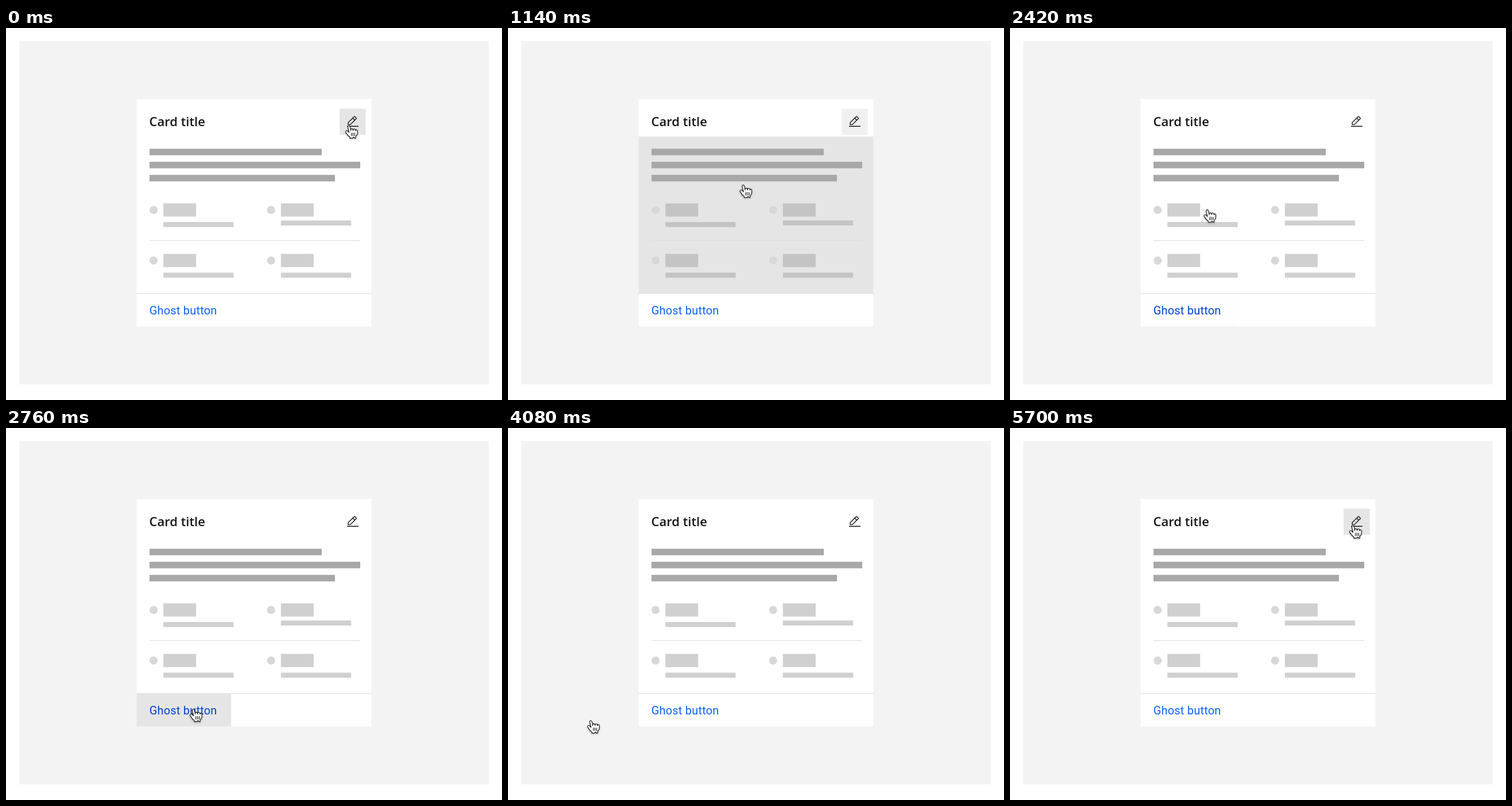
An HTML page that plays this animation: 864x648 px, repeating every 7.1 s.

```html
<!DOCTYPE html>
<html lang="en">
<head>
<meta charset="utf-8">
<title>Card actions</title>
<style>
  html, body { margin: 0; width: 100%; height: 100%; overflow: hidden; background: #fff; }
  svg { display: block; }
  .title { font: 600 22px "Open Sans", "Noto Sans", sans-serif; fill: #161616; }
  .link { font: 400 20px Roboto, "Noto Sans", sans-serif; letter-spacing: .2px; fill: #0f62fe; }
  .bar { fill: #a8a8a8; }
  .box { fill: #d0d0d0; }
  .dot { fill: #d8d8d8; }
  .rule { fill: #e0e0e0; }
  .shade { fill: none; }
  .picked .shade { fill: #e5e5e5; }
  .picked .box { fill: #c4c4c4; }
  #hand { filter: drop-shadow(0 1.4px 1.2px rgba(0, 0, 0, .32)); }
</style>
</head>
<body>
<svg width="864" height="648" viewBox="0 0 864 648">
  <rect x="22.7" y="22.9" width="818.6" height="597.7" fill="#f3f3f3"/>
  <rect x="227.4" y="123.8" width="409.2" height="396" fill="#fff"/>
  <text class="title" x="249.5" y="170.5">Card title</text>
  <rect id="edit" x="581.2" y="140.7" width="45.5" height="45.3"/>
  <path transform="translate(592.6 152) scale(.711)" fill="#161616" fill-rule="evenodd"
    d="M2 26H30V28H2zM25.4 9c.8-.8.8-2 0-2.8l-3.6-3.6c-.8-.8-2-.8-2.8 0L4 17.6V24h6.4zM20.4 4L24 7.6l-3 3L17.4 7zM6 22v-3.6l10-10 3.6 3.6-10 10z"/>
  <g id="content">
    <rect class="rule" x="227.4" y="461.8" width="409.2" height="1.4"/>
    <rect class="shade" x="227.4" y="189" width="409.2" height="274"/>
    <rect class="bar" x="250" y="210.3" width="300" height="11.4"/>
    <rect class="bar" x="250" y="233" width="367" height="11.4"/>
    <rect class="bar" x="250" y="255.8" width="323" height="11.4"/>
    <rect class="rule" x="250" y="369.5" width="367" height="1.4"/>
  </g>
  <rect id="hover" x="227.4" y="463" width="164.8" height="56.8" fill="#e5e5e5"/>
  <text class="link" id="link" x="249.7" y="499">Ghost button</text>
  <g id="hand" stroke="#000" stroke-width=".75" stroke-linecap="round" stroke-linejoin="round">
    <path fill="#fff" d="M11.3 20.4c-.3-.4-.6-1.1-1.2-2c-.3-.5-1.2-1.5-1.5-1.9c-.2-.4-.2-.6-.1-1c.1-.6.7-1.1 1.4-1.1c.5 0 1 .4 1.4.7c.2.2.5.6.7.8c.2.2.2.3.4.5c.2.3.3.5.2.1c-.1-.5-.2-1.3-.4-2.1c-.1-.6-.2-.7-.3-1.1c-.1-.5-.2-.8-.3-1.3c-.1-.3-.2-1.1-.3-1.5c-.1-.5-.1-1.4.3-1.8c.3-.3.9-.4 1.3-.2c.5.3.8 1 .9 1.3c.2.5.4 1.2.5 2c.2 1 .5 2.5.5 2.8c0-.4-.1-1.1 0-1.5c.1-.3.3-.7.7-.8c.3-.1.6-.1.9-.1c.3.1.6.3.8.5c.4.6.4 1.9.4 1.8c.1-.4.1-1.2.3-1.6c.1-.2.5-.4.7-.5c.3-.1.7-.1 1 0c.2 0 .6.3.7.5c.2.3.3 1.3.4 1.7c0 .1.1-.4.3-.7c.4-.6 1.8-.8 1.9.6v2.3c0 .4-.1 1.3-.2 1.7c-.1.3-.4 1-.7 1.4c0 0-1.1 1.2-1.2 1.8c-.1.6-.1.6-.1 1c0 .4.1.9.1.9s-.8.1-1.2 0c-.4-.1-.9-.8-1-1.1c-.2-.3-.5-.3-.7 0c-.2.4-.7 1.1-1.1 1.1c-.7.1-2.1 0-3.1 0c0 0 .2-1-.2-1.4c-.3-.3-.8-.8-1.1-1.1z"/>
    <path fill="none" d="M19.6 20.7V17.3M17.6 20.7L17.5 17.3M15.6 17.3V20.7"/>
  </g>
</svg>
<script>
const LOOP = 7100, STEP = 20, STEPS = 18;
const $ = id => document.getElementById(id);

function add(tag, cls, attrs) {
  const el = document.createElementNS("http://www.w3.org/2000/svg", tag);
  el.setAttribute("class", cls);
  for (const k in attrs) el.setAttribute(k, attrs[k]);
  $("content").append(el);
}

// Four placeholder items: x, y, y of the caption bar
for (const [x, y, cap] of [[250, 317, 338], [454.7, 317, 335.3], [250, 405, 426.2], [454.7, 405, 426.2]]) {
  add("circle", "dot", { cx: x + 7.1, cy: y, r: 7.1 });
  add("rect", "box", { x: x + 24.2, y: y - 11.5, width: 57, height: 23 });
  add("rect", "box", { x: x + 24.2, y: cap, width: 122.3, height: 8.7 });
}

// Pose after each move: start time, hand position, opacity of edit and hover backgrounds
const poses = [
  { at: -Infinity, x: 579.6, y: 158.3, edit: 1, hover: 0 },
  { at: 1000, x: 326.6, y: 297.8, edit: 0, hover: 0, picked: true },
  { at: 2420, x: 308.6, y: 477.8, edit: 0, hover: 1 },
  { at: 3740, x: 126.6, y: 497.8, edit: 0, hover: 0 },
  { at: 5360, x: 579.6, y: 158.3, edit: 1, hover: 0 }
];

// cubic-bezier(.25, .1, .25, 1)
function ease(x) {
  let lo = 0, hi = 1;
  for (let i = 0; i < 30; i++) {
    const m = (lo + hi) / 2;
    if (.75 * m * (1 - m) + m ** 3 < x) lo = m; else hi = m;
  }
  return .3 * lo * (1 - lo) ** 2 + 3 * lo * lo * (1 - lo) + lo ** 3;
}

function draw() {
  const t = performance.now() % LOOP;
  const n = poses.findLastIndex(p => t >= p.at);
  const to = poses[n], from = poses[Math.max(n - 1, 0)];
  const k = ease(Math.min(1, (Math.floor((t - to.at) / STEP) + 1) / STEPS));
  const mix = key => from[key] + (to[key] - from[key]) * k;

  $("hand").setAttribute("transform", `translate(${mix("x")} ${mix("y")}) scale(1.422)`);
  $("content").classList.toggle("picked", !!to.picked);
  $("edit").style.fill = to.picked ? "#c6c6c6" : "#e5e5e5";
  $("edit").style.opacity = mix("edit");
  $("hover").style.opacity = mix("hover");
  $("link").style.fill = to.hover ? "#0043ce" : "#0f62fe";
  requestAnimationFrame(draw);
}
draw();
</script>
</body>
</html>
```
